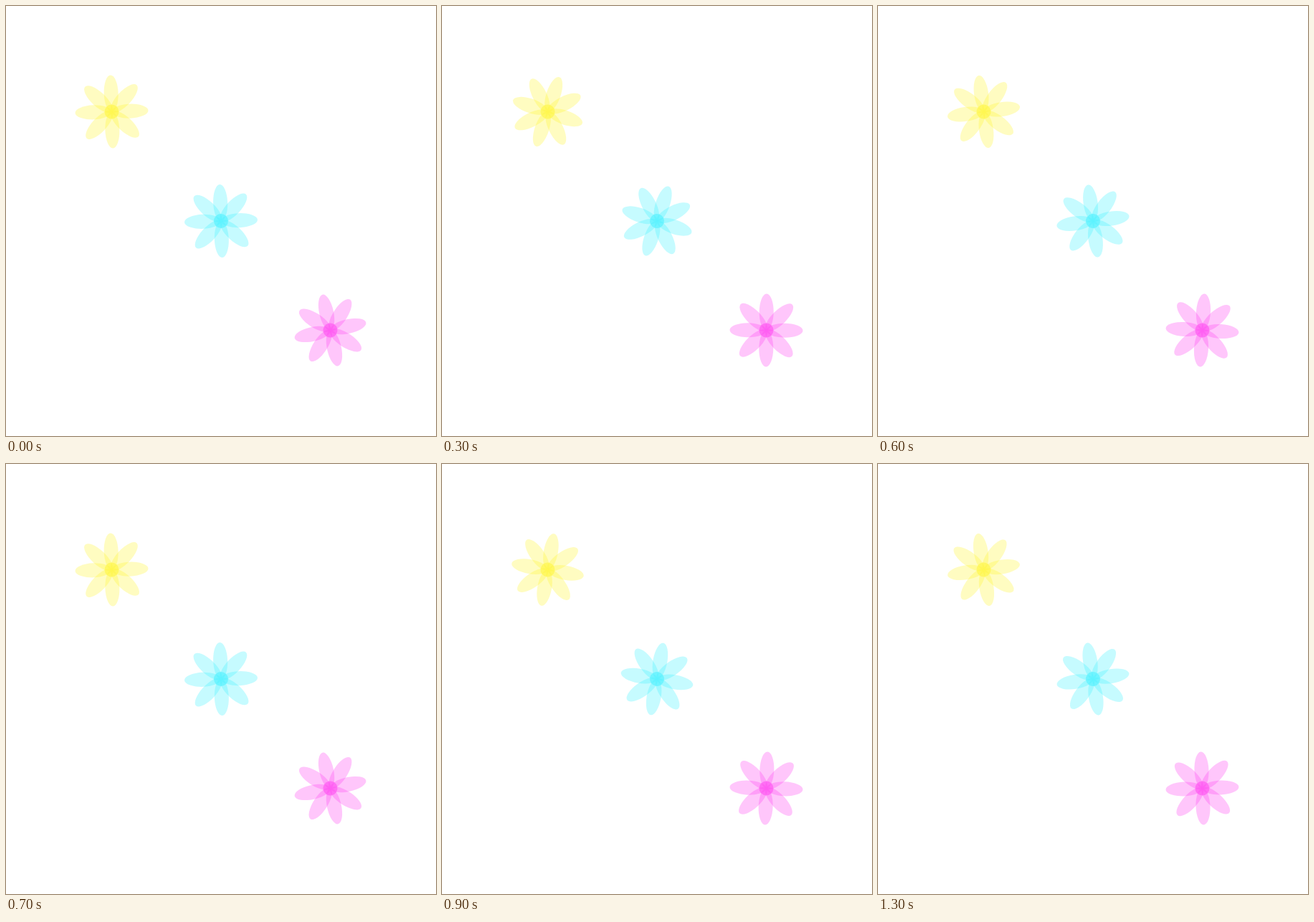
Recreate the animation shown at these times as an HTML page with a canvas. Size 600 px wide and 600 px high, loop 1400 ms.

```html
<!DOCTYPE html>
<html lang="en">
<head>
<meta charset="utf-8">
<title>Spinning flowers</title>
<style>
  html, body { margin: 0; width: 100%; height: 100%; overflow: hidden; background: #fff; }
  canvas { display: block; width: 600px; height: 600px; }
</style>
</head>
<body>
<canvas id="stage" width="600" height="600"></canvas>
<script>
const ctx = document.getElementById('stage').getContext('2d');
const TAU = Math.PI * 2;
const STEP = 100, STEPS = 14;
const PETALS = 8, LENGTH = 51, HALF_WIDTH = 10;

// tilt is the starting angle in degrees, speed a multiple of the shared turn
const flowers = [
  { at: 147.5, color: 'rgb(255,246,52)', tilt: -1.9, speed: 1 },
  { at: 300, color: 'rgb(66,240,255)', tilt: -1.9, speed: 1 },
  { at: 452.5, color: 'rgb(255,66,240)', tilt: -12.3, speed: 5 }
];

// A quarter turn per loop, slightly faster at the start than in the middle
function turn(progress) {
  return 90 * progress + 1.3 * Math.sin(TAU * progress);
}

function ellipse(x, y, rx, ry, alpha) {
  ctx.globalAlpha = alpha;
  ctx.beginPath();
  ctx.ellipse(x, y, rx, ry, 0, 0, TAU);
  ctx.fill();
}

function drawFlower({ at, color, tilt, speed }, progress) {
  ctx.save();
  ctx.translate(at, at);
  ctx.rotate((tilt + speed * turn(progress)) * TAU / 360);
  ctx.fillStyle = color;
  for (let i = 0; i < PETALS; i++) {
    ellipse(0, -LENGTH / 2, HALF_WIDTH, LENGTH / 2, 0.3);
    ctx.rotate(TAU / PETALS);
  }
  ellipse(0, 0, 10, 10, 0.5);
  ctx.restore();
}

const start = performance.now();

function frame() {
  const time = Math.max(0, performance.now() - start);
  const step = Math.floor(time / STEP) % STEPS;
  ctx.clearRect(0, 0, 600, 600);
  flowers.forEach(flower => drawFlower(flower, step / STEPS));
  requestAnimationFrame(frame);
}
frame();
</script>
</body>
</html>
```
